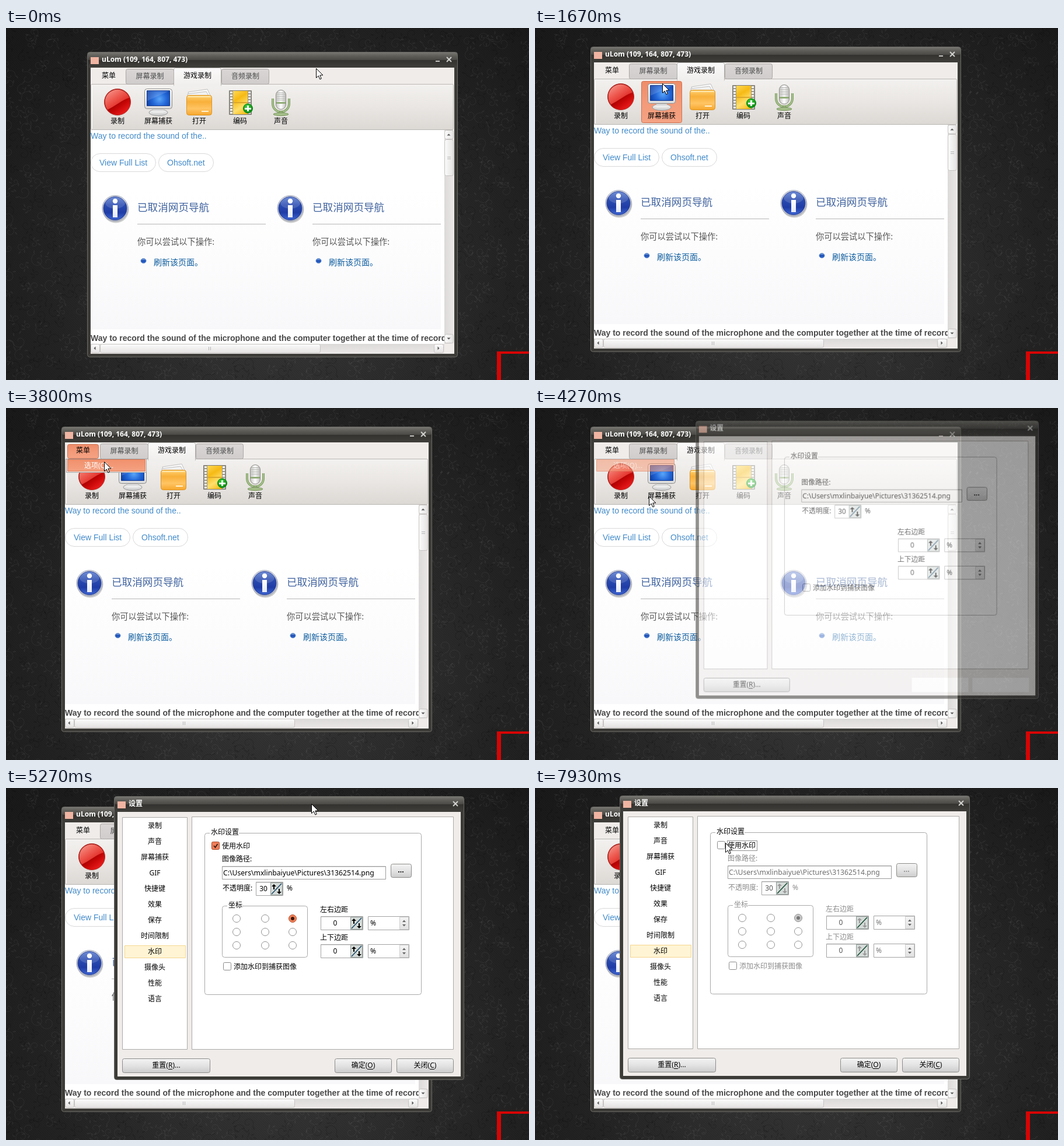
Write an HTML page with a canvas that moves like this. It is 896 px wide and 604 px high and loops after 8000 ms.

```html
<!DOCTYPE html>
<html lang="zh">
<head>
<meta charset="utf-8">
<title>Recorder settings</title>
<style>
html, body { margin: 0; width: 100%; height: 100%; overflow: hidden; background: #222; }
canvas { display: block; }
</style>
</head>
<body>
<canvas id="stage" width="896" height="604"></canvas>
<script>
const W = 896, H = 604, LOOP = 8000, TICK = 1000 / 15;
const UI = '"Noto Sans", "Noto Sans CJK SC", "Noto Sans CJK", sans-serif';
const CJK = '"Noto Sans CJK SC", "Noto Sans CJK", sans-serif';
const WEB = '"Liberation Sans", Arial, sans-serif';
const stage = document.getElementById('stage').getContext('2d');
let g = stage;

function layer(draw) {
  const c = document.createElement('canvas');
  c.width = W; c.height = H;
  const prev = g;
  g = c.getContext('2d');
  draw();
  g = prev;
  return c;
}

function grad(x0, y0, x1, y1, ...colors) {
  const p = g.createLinearGradient(x0, y0, x1, y1);
  colors.forEach((c, i) => p.addColorStop(i / (colors.length - 1), c));
  return p;
}
const vert = (y0, y1, ...colors) => grad(0, y0, 0, y1, ...colors);

function radial(x, y, r, ...colors) {
  const p = g.createRadialGradient(x, y, 0, x, y, r);
  colors.forEach((c, i) => p.addColorStop(i / (colors.length - 1), c));
  return p;
}

function paint(fill, line, width = 1) {
  if (fill) { g.fillStyle = fill; g.fill(); }
  if (line) { g.strokeStyle = line; g.lineWidth = width; g.stroke(); }
}

// Box given by its outer pixel edges, with an optional one pixel border.
function box(x0, y0, x1, y1, fill, line, r = 0) {
  const o = line ? 0.5 : 0;
  g.beginPath();
  g.roundRect(x0 + o, y0 + o, x1 - x0 - 2 * o, y1 - y0 - 2 * o, r);
  paint(fill, line);
}

function disc(x, y, r, fill, line, ry = r) {
  g.beginPath();
  g.ellipse(x, y, r, ry, 0, 0, 7);
  paint(fill, line);
}

function path(points, fill, line, width) {
  g.beginPath();
  for (let i = 0; i < points.length; i += 2) g.lineTo(points[i], points[i + 1]);
  if (fill) g.closePath();
  paint(fill, line, width);
}

function text(s, x, y, color = '#000', size = 12, align = 'left', font = UI, weight = '') {
  g.font = `${weight} ${size}px ${font}`;
  g.textAlign = align;
  g.fillStyle = color;
  g.fillText(s, x, y + size * 0.37);
}

const clamp = v => Math.max(0, Math.min(1, v));

// Wallpaper: vignette, fine weave and faint curled vines.
const wallpaper = layer(() => {
  g.fillStyle = radial(470, 430, 600, '#393939', '#2f2f2f', '#232323', '#1a1a1a');
  g.fillRect(0, 0, W, H);
  g.lineWidth = 1;
  g.strokeStyle = 'rgba(0,0,0,.1)';
  g.beginPath();
  for (let i = -H; i < W; i += 4) { g.moveTo(i, 0); g.lineTo(i + H, H); }
  g.stroke();
  let seed = 41;
  const rnd = () => (seed = (seed * 16807) % 2147483647) / 2147483647;
  for (let i = 0; i < 1080; i++) {
    const x = (i % 40) * 23 + rnd() * 18, y = Math.floor(i / 40) * 23 + rnd() * 18;
    const a = rnd() * 6.3, dir = rnd() < 0.5 ? 1 : -1, size = 5 + rnd() * 8;
    const ink = rnd() < 0.6 ? 'rgba(255,255,255,.05)' : 'rgba(0,0,0,.14)';
    g.beginPath();
    for (let s = 0; s <= 1; s += 0.05) {
      const r = size * (1 - s * 0.85), b = a + dir * s * 7;
      g.lineTo(x + r * Math.cos(b), y + r * Math.sin(b));
    }
    paint(null, ink, 1.1);
    for (let k = 0; k < 3; k++) {
      const b = a + k * 0.8, d = size + 3;
      g.beginPath();
      g.ellipse(x + d * Math.cos(b), y + d * Math.sin(b), 3, 1.2, b + 0.6, 0, 7);
      paint(ink);
    }
  }
  box(841, 555, 896, 559, '#d80404');
  box(841, 555, 848, 604, '#d80404');
});

function frame(x0, y0, x1, y1, title) {
  box(x0, y0, x1, y1, '#3c3b37', '#6b6a65', 4);
  box(x0 + 1, y0 + 1, x1 - 1, y0 + 14, vert(y0, y0 + 14, '#7b7a74', '#5e5d58', '#4a4945'), null, 3);
  box(x0 + 1, y0 + 14, x1 - 1, y0 + 27, vert(y0 + 14, y0 + 27, '#33322f', '#403f3b'));
  box(x0 + 6, y0 + 9, x0 + 20, y0 + 21, '#f0b4a2');
  text(title, x0 + 25, y0 + 13, '#fff', 12, 'left', UI, 'bold');
  const x = x1 - 15, y = y0 + 13;
  path([x - 4, y - 4, x + 4, y + 4], null, '#d2d2d0', 2);
  path([x + 4, y - 4, x - 4, y + 4], null, '#d2d2d0', 2);
}

function hot(x0, y0, x1, y1) {
  box(x0, y0, x1, y1, vert(y0, y1, '#ee8c69', '#f39a79', '#f4a384'), '#d2704f', 3);
}

function recordIcon() {
  disc(191, 127, 22.5, grad(186, 123, 203, 146, '#940000', '#c40606', '#ea1c1c'), '#b0302a');
  g.save();
  g.beginPath(); g.arc(191, 127, 21.5, 0, 7); g.clip();
  g.beginPath();
  g.moveTo(165, 100); g.lineTo(217, 100); g.lineTo(214, 119);
  g.bezierCurveTo(200, 122, 188, 134, 170, 142);
  g.lineTo(165, 142);
  paint(grad(176, 106, 195, 134, '#f5948a', '#ee5c52', '#e02a24'));
  g.restore();
}

function monitorIcon() {
  disc(261, 145, 16, vert(139, 151, '#fff', '#c6c6c6'), '#9a9a9a', 5.5);
  box(252, 136, 270, 145, vert(136, 145, '#b9b9b9', '#f6f6f6'));
  box(237, 104, 285, 139, vert(104, 139, '#fdfdfd', '#dadada'), '#8c8c8c', 4);
  box(241, 107, 281, 134, radial(263, 122, 24, '#5aa6fa', '#2468d8', '#0b3da6'), '#12388c');
  path([242, 108, 280, 108, 242, 125], 'rgba(255,255,255,.14)');
}

function folderIcon() {
  path([312, 110, 345, 105, 351, 118, 315, 122], '#fafafa', '#c0c0c0');
  path([311, 113, 343, 109, 350, 121, 312, 123], '#f1f1f1', '#c0c0c0');
  box(309, 115, 353, 150, vert(115, 150, '#ffd272', '#f8b03a', '#ffc463', '#f6a52a'), '#dc9424', 4);
  box(311, 117, 351, 119, '#ffe4a6');
  box(335, 142, 347, 144, '#fff3d2');
}

function filmIcon() {
  box(382, 107, 421, 149, '#9a988e', '#7c7a72');
  box(389, 108, 414, 148, grad(389, 108, 414, 148, '#ffd957', '#f6ba14', '#ffdf6c', '#f4b60a'));
  box(389, 127, 414, 129, '#dca72a');
  for (let y = 109; y < 148; y += 5) {
    box(384, y, 388, y + 3, '#f2f2f2');
    box(415, y, 419, y + 3, '#f2f2f2');
  }
  disc(414.5, 138, 8, radial(413, 135, 10, '#3fd03f', '#0a8f12'), '#0a7d12');
  box(413, 133, 416, 143, '#fff');
  box(409, 137, 420, 140, '#fff');
}

function micIcon() {
  g.beginPath();
  g.moveTo(457, 121); g.lineTo(457, 130);
  g.arc(471, 130, 14, Math.PI, 0, true);
  g.lineTo(485, 121);
  paint(null, '#7d9a63', 4);
  paint(null, '#a9c48d', 2);
  box(468, 142, 474, 149, '#98b57b', '#7d9a63');
  disc(471, 148, 13, '#a6c08a', '#7a965f', 2.5);
  box(462, 106, 480, 140, grad(462, 0, 480, 0, '#c4c4c2', '#fff', '#bcbcba'), '#8c8c88', 9);
  for (let y = 111; y < 126; y += 3) box(464, y, 478, y + 1, '#aeaeaa');
  box(463, 127, 479, 130, '#93ad79');
}

function infoPane(x) {
  disc(x + 43, 312, 22.5, 'rgba(0,0,0,.2)');
  disc(x + 42, 309.5, 22, vert(287, 332, '#f6f7fa', '#c3c8d6'), '#8f97aa');
  disc(x + 42, 309.5, 20, vert(290, 330, '#5577cc', '#2b4cb0', '#1f3ca6', '#3f67d4'), '#24398c');
  g.beginPath();
  g.ellipse(x + 42, 300, 17, 10, 0, 0, 7);
  paint('rgba(255,255,255,.14)');
  disc(x + 42, 297, 4.2, '#fff');
  box(x + 38, 304, x + 46, 325, vert(304, 325, '#fff', '#e4e9f6'));
  text('已取消网页导航', x + 80, 307, '#40639f', 17.6, 'left', CJK);
  box(x + 80, 336, x + 300, 337, '#b6b6b6');
  text('你可以尝试以下操作:', x + 80, 367, '#575757', 14.25, 'left', CJK);
  disc(x + 90.5, 399.5, 4.5, vert(395, 404, '#9bc0f0', '#1a4cb4', '#3f78d8'), '#5b86c8', 4);
  text('刷新该页面。', x + 108, 402, '#0a5a9c', 14, 'left', CJK);
}

function knob(x0, y0, x1, y1, across) {
  const fill = across ? grad(x0, 0, x1, 0, '#fcfcfc', '#e4e2e1') : vert(y0, y1, '#fcfcfc', '#e4e2e1');
  box(x0, y0, x1, y1, fill, '#c6c3c1', 3);
}

function arrow(x, y, dx, dy) {
  path([x + dx * 1.5, y + dy * 1.5, x - dx * 1.5 + dy * 3, y - dy * 1.5 + dx * 3,
    x - dx * 1.5 - dy * 3, y - dy * 1.5 - dx * 3], '#555');
}

function scrollbars() {
  box(751, 175, 768, 559, grad(751, 0, 768, 0, '#dcdad9', '#ebe8e7'));
  box(145, 542, 768, 559, vert(542, 559, '#dcdad9', '#ebe8e7'));
  box(751, 542, 768, 559, '#efecea');
  knob(751, 175, 767, 191, true);
  knob(751, 191, 767, 254, true);
  knob(751, 525, 767, 541, true);
  knob(145, 542, 161, 558);
  knob(161, 542, 539, 558);
  knob(733, 542, 750, 558);
  arrow(758.5, 183, 0, -1); arrow(758.5, 533, 0, 1);
  arrow(152, 549.5, -1, 0); arrow(741, 549.5, 1, 0);
  for (const k of [0, 3]) {
    box(756, 221 + k, 762, 222 + k, '#b4b4b4');
    box(347 + k, 547, 348 + k, 553, '#b4b4b4');
  }
}

function tab(x0, x1, label, on, lit) {
  if (on) {
    box(x0, 68, x1, 101, vert(68, 98, '#fbfafa', '#f1efed'), '#b3b0ae', 3);
    box(x0 + 1, 96, x1 - 1, 102, '#f1efed');
  } else {
    box(x0, 70, x1, 97, vert(70, 97, lit ? '#e6e3e2' : '#d9d6d5', '#cfcccb'), '#aaa7a5', 3);
  }
  text(label, (x0 + x1) / 2, on ? 82 : 83, on || lit ? '#000' : '#4d4d4d', 12, 'center');
}

const TOOLS = ['录制', '屏幕捕获', '打开', '编码', '声音'];

function mainWindow(px, py, menuOpen, free) {
  const over = (x0, y0, x1, y1) => free && px >= x0 && px < x1 && py >= y0 && py < y1;
  frame(139, 41, 774, 565, 'uLom (109, 164, 807, 473)');
  box(736, 56, 743, 58, '#c4c4c2');
  box(145, 68, 768, 559, '#efecea');
  box(145, 96, 767, 175, vert(97, 174, '#f3f1ef', '#e9e6e3', '#dcd9d5'), '#bab7b4', 2);
  box(147, 98, 148, 173, '#fff');
  if (menuOpen || over(149, 71, 203, 96)) hot(149, 71, 203, 96);
  text('菜单', 176, 82, '#000', 12, 'center');
  tab(205, 288, '屏幕录制', false, over(205, 70, 288, 97));
  tab(369, 451, '音频录制', false, over(369, 70, 451, 97));
  tab(287, 369, '游戏录制', true);
  TOOLS.forEach((label, i) => {
    const x = 156 + i * 70;
    if (!menuOpen && over(x, 100, x + 70, 172)) hot(x, 100, x + 70, 172);
    text(label, x + 35, 159.5, '#000', 12, 'center');
  });
  recordIcon(); monitorIcon(); folderIcon(); filmIcon(); micIcon();

  g.save();
  g.beginPath(); g.rect(145, 175, 606, 367); g.clip();
  box(145, 175, 751, 542, '#fff');
  box(145, 277, 745, 517, vert(277, 517, '#fff', '#fcfcfd', '#f8f8fa'));
  text('Way to record the sound of the..', 145, 185, '#428bca', 14, 'left', WEB);
  box(145, 215, 257, 247, '#fff', '#d9d9d9', 15.5);
  box(261, 215, 356, 247, '#fff', '#d9d9d9', 15.5);
  text('View Full List', 160, 231, '#428bca', 14, 'left', WEB);
  text('Ohsoft.net', 276, 231, '#428bca', 14, 'left', WEB);
  infoPane(145);
  infoPane(445);
  text('Way to record the sound of the microphone and the computer together at the time of recording',
    145, 532, '#484848', 14, 'left', WEB, 'bold');
  g.restore();
  scrollbars();
}

function menuItem(lit) {
  if (lit) box(105, 88, 239, 109, vert(88, 109, '#f0906c', '#f5a282'), '#dc7a58');
  text('选项(Q)...', 134, 99, lit ? '#fff' : '#000');
}

function button(x0, y0, x1, y1) {
  box(x0, y0, x1, y1, vert(y0, y1, '#f4f4f4', '#e3e3e3', '#cbcbcb'), '#8d8c8a', 3);
}

// Button caption with an underlined access key.
function keyLabel(word, key, tail, cx, y) {
  g.font = `12px ${UI}`;
  const w = s => g.measureText(s).width;
  const x = cx - w(word + '(' + key + ')' + tail) / 2;
  text(word + '(' + key + ')' + tail, x, y);
  const kx = x + w(word + '(');
  box(Math.round(kx), y + 6, Math.round(kx + w(key)), y + 7, '#000');
}

function check(x, y, on) {
  box(x, y, x + 14, y + 14, on ? '#ee7f5b' : '#fff', on ? '#a8492c' : '#8a8a8a', 2);
  if (on) path([x + 4, y + 7, x + 6.5, y + 10, x + 10.5, y + 4], null, '#3a1a10', 1.8);
}

function spinner(x0, y, x1, value, vx, dim) {
  box(x0, y, x1, y + 24, '#fff', '#a3a3a3');
  box(x0 + 1, y + 1, x1 - 1, y + 2, '#ddd');
  text(value, vx, y + 11.5, dim ? '#555' : '#000', 12, 'center');
  const x = x1 - 22, c = dim ? '#9a9a9a' : '#000';
  box(x, y + 1, x1 - 1, y + 23, '#d5dbd8', '#8d9794');
  path([x + 2, y + 21, x + 19, y + 3], null, dim ? '#174d36' : '#1d4a6a', 1.6);
  path([x + 6, y + 4, x + 10, y + 8, x + 7, y + 8, x + 7, y + 13, x + 5, y + 13, x + 5, y + 8, x + 2, y + 8], c);
  path([x + 15, y + 21, x + 19, y + 17, x + 16, y + 17, x + 16, y + 12, x + 14, y + 12, x + 14, y + 17, x + 11, y + 17], c);
}

function combo(y, dim) {
  box(580, y, 651, y + 24, '#fff', '#a3a3a3');
  box(634, y + 1, 650, y + 23, vert(y, y + 24, '#f6f6f6', '#e0e0e0'), '#cfcfcf');
  text('%', 584, y + 11.5, dim ? '#777' : '#000');
  path([639, y + 10, 645, y + 10, 642, y + 6.5], '#666');
  path([639, y + 14, 645, y + 14, 642, y + 17.5], '#666');
}

function groupBox(x0, y0, x1, y1, label, color) {
  box(x0, y0, x1, y1, null, '#a9a9a9', 4);
  box(x0 + 9, y0 - 2, x0 + 59 - (label.length < 3 ? 24 : 0), y0 + 3, '#fff');
  text(label, x0 + 11, y0 - 1, color);
}

const PAGES = ['录制', '声音', '屏幕捕获', 'GIF', '快捷键', '效果', '保存', '时间限制', '水印', '摄像头', '性能', '语言'];

function dialog(raw, dim, focus) {
  const ink = dim ? '#8c8c8c' : '#000';
  frame(145, 13, 745, 500, '设置');
  box(151, 40, 739, 494, '#efecea');
  box(159, 49, 271, 448, '#fff', '#adaaa8');
  box(278, 48, 727, 448, '#fff', '#adaaa8');
  if (!raw) {
    box(163, 269, 268, 291, '#fff4d4', '#f4d690');
    PAGES.forEach((s, i) => text(s, 215, 63.5 + 27 * i, '#000', 12, 'center'));
  }
  groupBox(300, 76, 672, 354, '水印设置', '#000');
  if (!raw) {
    check(312, 91, !dim);
    text('使用水印', 330, 98.5);
    if (focus) {
      g.setLineDash([1, 1]);
      box(329, 90, 381, 108, null, '#222');
      g.setLineDash([]);
    }
  }
  text('图像路径:', 330, 121, ink);
  box(330, 133, 611, 156, '#fff', '#9b9b9b');
  box(331, 134, 610, 135, '#ddd');
  text('C:\\Users\\mxlinbaiyue\\Pictures\\31362514.png', 332, 144, dim ? '#6e6e6e' : '#000', 12.2);
  button(619, 129, 655, 153);
  text('...', 636.5, 140, ink, 12, 'center', UI, 'bold');
  text('不透明度:', 331, 171, ink);
  spinner(388, 160, 435, '30', 401, dim);
  text('%', 441, 171, ink);
  if (!raw) {
    groupBox(330, 201, 477, 290, '坐标', ink);
    for (const y of [223, 246, 269]) for (const x of [355, 404, 451]) {
      const on = x === 451 && y === 223;
      disc(x, y, 6.5, on ? (dim ? '#c9c9c9' : '#f08059') : '#fff', on && !dim ? '#b5512f' : '#929292');
      if (on) disc(x, y, 3, dim ? '#777' : '#3a1508');
    }
  }
  text('左右边距', 498, 208, ink);
  text('上下边距', 498, 256, ink);
  for (const y of [219, 267]) {
    spinner(499, y, 572, '0', 524, dim);
    combo(y, dim);
  }
  check(332, 298, false);
  text('添加水印到捕获图像', 350, 306, ink);
  button(159, 463, 310, 488);
  keyLabel('重置', 'R', '...', 234.5, 475);
  if (raw) {
    box(523, 463, 622, 488, '#fff');
    box(629, 463, 728, 488, '#fff');
  } else {
    button(523, 463, 621, 488);
    button(629, 463, 727, 488);
    keyLabel('确定', 'O', '', 572, 475);
    keyLabel('关闭', 'C', '', 678, 475);
  }
}

// Tracks: [time, x, y]
const WINDOW = [[400, 139, 41], [533, 86, 36], [667, 50, 34], [800, 97, 41], [933, 97, 41], [1067, 95, 32]];
const PANEL = [[4933, 269, 17], [5267, 185, 14], [5467, 138, 12], [5533, 145, 13]];
const POINTER = [
  [0, 531, 69], [333, 591, 48], [933, 549, 48], [1067, 547, 39], [1333, 420, 62],
  [1667, 218, 95], [1800, 224, 104], [2000, 160, 122], [2267, 345, 148], [2400, 428, 215],
  [2667, 225, 125], [2733, 262, 78], [2800, 207, 75], [3133, 130, 74], [3400, 130, 74],
  [3933, 180, 98], [4133, 182, 100], [4267, 195, 151], [4933, 607, 30], [5533, 483, 26],
  [5667, 498, 28], [6000, 369, 100], [6267, 335, 242], [6467, 350, 202], [6533, 358, 200],
  [6867, 390, 140], [7267, 343, 94], [7400, 343, 94], [7533, 331, 86], [7667, 331, 86], [7733, 326, 94]
];

function at(track, t) {
  if (t <= track[0][0]) return track[0].slice(1);
  for (let i = 1; i < track.length; i++) {
    const [t0, x0, y0] = track[i - 1], [t1, x1, y1] = track[i];
    if (t < t1) {
      const k = (t - t0) / (t1 - t0);
      return [Math.round(x0 + (x1 - x0) * k), Math.round(y0 + (y1 - y0) * k)];
    }
  }
  return track[track.length - 1].slice(1);
}

function shifted(dx, dy, draw) {
  g.save();
  g.translate(dx, dy);
  draw();
  g.restore();
}

function pointer(x, y) {
  shifted(x + 0.5, y + 0.5, () =>
    path([0, 0, 0, 16, 3.8, 12.6, 6.4, 18.5, 8.8, 17.4, 6.3, 11.6, 11.4, 11.4], '#fff', '#000'));
}

function render(time) {
  const t = Math.floor((time + 4) / TICK) * TICK;
  const [wx, wy] = at(WINDOW, t), [dx, dy] = at(PANEL, t);
  let [px, py] = at(POINTER, t);
  if (t > 400 && t < 1067) { px = wx + 452; py = wy + 7; }
  if (t > 4933 && t < 5533) { px = dx + 338; py = dy + 13; }
  const menu = t > 3330 && t < 4130;

  g.drawImage(wallpaper, 0, 0);
  shifted(wx - 139, wy - 41, () => mainWindow(px - wx + 139, py - wy + 41, menu, t < 4130));
  if (menu) {
    box(103, 87, 241, 111, '#f8f7f6', '#a09d9a');
    menuItem(py >= 88);
  } else if (t > 4130 && t < 4430) {
    g.globalAlpha = clamp(1 - (t - 4130) / 300);
    menuItem(true);
    g.globalAlpha = 1;
  }

  const show = clamp((t - 4130) / 245);
  if (show === 1) {
    shifted(dx - 145, dy - 13, () => dialog(false, t > 7860, t > 7795));
  } else if (show > 0.05) {
    const pic = layer(() => shifted(124, 4, () => dialog(true, false, false)));
    const s = 0.955 + 0.045 * show;
    g.save();
    g.globalAlpha = show;
    g.translate(569, 261);
    g.scale(s, s);
    g.drawImage(pic, -569, -261);
    g.restore();
  }
  pointer(px, py);
}

const start = performance.now();
function loop() {
  render((performance.now() - start) % LOOP);
  requestAnimationFrame(loop);
}
loop();
</script>
</body>
</html>
```
